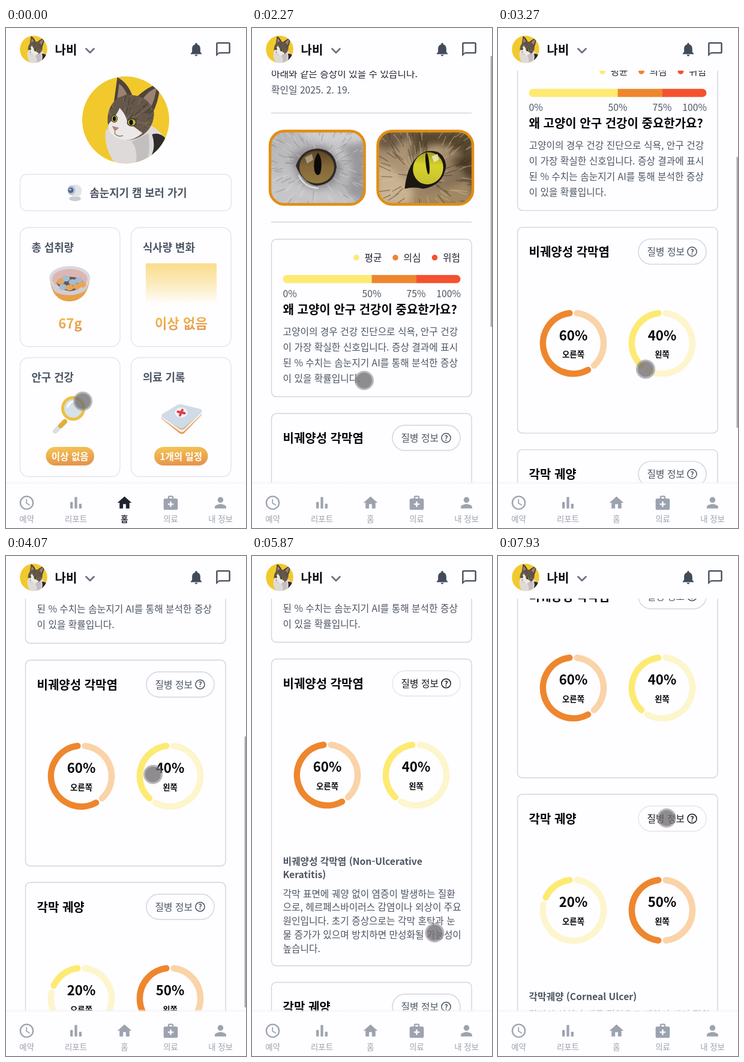
Recreate the animation shown at these times as an HTML page. Size 400 px wide and 832 px high, loop 8000 ms.

```html
<!DOCTYPE html>
<html lang="ko">
<head>
<meta charset="utf-8">
<title>고양이 건강</title>
<style>
html, body { margin: 0; width: 100%; height: 100%; overflow: hidden; background: #fefdff; }
svg { display: block; position: fixed; inset: 0; width: 100%; height: 100%; }
text { font-family: "Noto Sans CJK KR", "Noto Sans CJK", "Noto Sans KR", sans-serif; }
</style>
</head>
<body>
<svg id="stage" viewBox="0 0 400 832"></svg>
<script>
const LOOP = 8000;
const INK = '#050507', GRAY = '#4b5563', MUTED = '#9ca3af', LINE = '#d1d3de', PALE = '#e4e4ee';
const YELLOW = '#fdea72', ORANGE = '#ee862e', RED = '#f4512f';
const TINT = { [YELLOW]: '#fdf5cc', [ORANGE]: '#fad3a8' };
const BRAND = '솜눈지기';

// cy is the optical middle of the line
const text = (x, cy, size, str, fill = INK, bold = 0, anchor = 'start') =>
  `<text x="${x}" y="${cy + size * .36}" font-size="${size}" font-weight="${bold ? 700 : 400}" fill="${fill}" text-anchor="${anchor}">${str}</text>`;
const lines = (x, cy, step, rows, fill) => rows.map((row, i) => text(x, cy + i * step, 15.75, row, fill)).join('');
const box = (x, y, w, h, r, stroke, attrs = '') =>
  `<rect x="${x}" y="${y}" width="${w}" height="${h}" rx="${r}" fill="#fefdff" stroke="${stroke}" stroke-width="1.4" ${attrs}/>`;
const path = (d, fill, attrs = '') => `<path d="${d}" fill="${fill}" ${attrs}/>`;
const stroke = (d, color, w, attrs = '') =>
  path(d, 'none', `stroke="${color}" stroke-width="${w}" stroke-linecap="round" stroke-linejoin="round" ${attrs}`);
const oval = (x, y, rx, ry, fill, attrs = '') => `<ellipse cx="${x}" cy="${y}" rx="${rx}" ry="${ry}" fill="${fill}" ${attrs}/>`;
const dot = (x, y, r, fill, attrs) => oval(x, y, r, r, fill, attrs);
const rule = y => `<path d="M32 ${y}H366" stroke="${LINE}" stroke-width="1.5"/>`;
const icon = (x, y, s, d, fill) => path(d, fill, `transform="translate(${x - 12 * s} ${y - 12 * s}) scale(${s})"`);
const gradient = (id, x2, y2, stops) =>
  `<linearGradient id="${id}" x1="0" y1="0" x2="${x2}" y2="${y2}">${stops.map((c, i) =>
    `<stop offset="${i / (stops.length - 1)}" stop-color="${c}"/>`).join('')}</linearGradient>`;
const soft = art => `<g filter="url(#soft)">${art}</g>`;

// Seeded hairs in a w x h area; angle(x, y) gives their direction
function fur(seed, count, x0, y0, w, h, len, angle, colors) {
  const rand = () => (seed = seed * 16807 % 2147483647) / 2147483647;
  return colors.map(color => {
    let d = '';
    for (let i = 0; i < count; i++) {
      const x = x0 + rand() * w, y = y0 + rand() * h;
      const a = angle(x, y) + (rand() - .5) * .6, l = len * (.6 + rand() * .8);
      d += `M${x.toFixed(1)} ${y.toFixed(1)}l${(l * Math.cos(a)).toFixed(1)} ${(l * Math.sin(a)).toFixed(1)}`;
    }
    return stroke(d, color, 1.5, 'opacity=".42"');
  }).join('');
}
const away = (cx, cy) => (x, y) => Math.atan2(y - cy, x - cx);

const ICONS = {
  bell: 'M12 22c1.1 0 2-.9 2-2h-4c0 1.1.89 2 2 2zm6-6v-5c0-3.07-1.64-5.64-4.5-6.32V4c0-.83-.67-1.5-1.5-1.5s-1.5.67-1.5 1.5v.68C7.63 5.36 6 7.92 6 11v5l-2 2v1h16v-1l-2-2z',
  chat: 'M20 2H4c-1.1 0-2 .9-2 2v18l4-4h14c1.1 0 2-.9 2-2V4c0-1.1-.9-2-2-2zm0 14H6l-2 2V4h16v12z',
  clock: 'M12 2a10 10 0 1 0 0 20a10 10 0 1 0 0-20zm0 18a8 8 0 1 1 0-16a8 8 0 1 1 0 16zM12.5 7H11v6l5.2 3.1.8-1.2-4.5-2.7z',
  bars: 'M4 11h3.6v9H4zm6.2-7h3.6v16h-3.6zm6.2 9.5H20V20h-3.6z',
  home: 'M10 20v-6h4v6h5v-8h3L12 3 2 12h3v8z',
  medical: 'M20 6h-4V4c0-1.1-.9-2-2-2h-4c-1.1 0-2 .9-2 2v2H4c-1.1 0-2 .9-2 2v12c0 1.1.9 2 2 2h16c1.1 0 2-.9 2-2V8c0-1.1-.9-2-2-2zM10 4h4v2h-4V4zm6 11h-3v3h-2v-3H8v-2h3v-3h2v3h3v2z',
  person: 'M12 12c2.21 0 4-1.79 4-4s-1.79-4-4-4-4 1.79-4 4 1.79 4 4 4zm0 2c-2.67 0-8 1.34-8 4v2h16v-2c0-2.66-5.33-4-8-4z'
};

const HEAD = 'M-30-6Q-26-36 2-42Q38-42 47-14Q48 10 30 24Q4 42-18 26Q-32 14-30-6Z';
const cat = `<g id="cat" clip-path="url(#round)">
  <rect x="-73" y="-73" width="146" height="146" fill="#f2c92c"/>
  ${path('M-33 16Q-38 46-16 75L60 75 62 26Q40 0 20 8Z', '#dedad9')}
  ${path('M10 36Q22 52 16 75L34 75Q42 50 38 22Z', '#c3bfc0')}
  ${path('M44 24Q62 18 74 42L72 75 30 75Q54 55 44 24Z', '#2f2b2a')}
  ${path('M-21-20L-14-71Q4-62 12-38Z', '#4f443a')}${path('M-14-36L-11-60Q-2-54 3-40Z', '#9c8272')}
  ${path('M18-38Q40-58 57-60Q56-32 44-10Z', '#4f443a')}${path('M29-36Q40-50 51-53Q49-34 42-22Z', '#9c8272')}
  ${path(HEAD, '#65574a')}
  <g clip-path="url(#head)">${fur(11, 45, -34, -44, 82, 66, 9, away(-6, 12), ['#2f2822', '#96846e'])}</g>
  ${path('M-10-20Q0-10 3 4Q18 14 28 22Q4 42-18 28Q-33 17-28 6Q-16-6-10-20Z', '#ece8e7')}
  ${oval(-19, -2, 5.5, 6.5, '#2b251d')}${oval(-19, -2, 4.5, 5.5, '#bdb53d')}${oval(-19, -2, 2.6, 4, '#14110e')}
  ${oval(10, 4, 8, 6.8, '#2b251d')}${oval(10, 4, 6.6, 5.6, '#bdb53d')}${oval(9, 4, 3.2, 4.6, '#14110e')}
  ${path('M-23 10L-11 13-18 19Z', '#b8837a')}${stroke('M-18 19L-18 23M-18 23Q-12 29-5 26', '#8d7872', 1.4)}
</g>`;
const useCat = (x, y, r) => `<use href="#cat" transform="translate(${x} ${y}) scale(${r / 72.5})"/>`;

const webcam = oval(115, 284, 10, 4, '#c9c9d2') + dot(116, 271, 10.5, '#e3e3ea') +
  oval(109, 270, 6.5, 8, '#bcc0cd') + dot(108, 270, 4.5, '#4d648c') + dot(107, 269, 1.8, '#a9c6ee');
const bowl = path('M73 416Q76 455 107 455Q137 453 140 414Z', '#e8a04b') +
  path('M72.5 414Q74 432 83 440Q107 450 131 438Q139 430 140 412Z', '#cfcdd3') +
  oval(106.3, 416, 34, 20, '#d9d8de') + oval(106.3, 418, 29.5, 17, '#dcb6b1') +
  path('M84 424Q92 414 106 414Q124 414 130 424Q122 437 106 438Q90 436 84 424Z', '#5d5a60') +
  [[91, 422, 0], [100, 417, 1], [111, 423, 1], [121, 420, 1], [95, 431, 1], [106, 432, 0], [118, 430, 0], [127, 427, 0]]
    .map(([x, y, c]) => oval(x, y, 6.5, 5, c ? '#a6bbd2' : '#e7a557')).join('');
const magnifier = stroke('M97 656L82 671', '#d9dfe4', 8) + stroke('M98 655L91 662', '#e6ad38', 8) +
  `<ellipse cx="112" cy="633" rx="17.5" ry="18" fill="#d5e2ea" stroke="#eebf42" stroke-width="5"/>` +
  stroke('M103 630Q106 622 114 621', '#fff', 3);
const kit = path('M259 650L289 674Q293 677 297 674L326 644 326 640 260 645Z', '#e59a4c') +
  path('M259 645L289 667Q293 669 297 667L326 638 326 643 297 671Q293 674 289 671L260 650Z', '#eeeef2') +
  path('M261 642L286 627Q290 625 295 627L324 634Q328 636 325 640L297 665Q293 668 288 665L261 648Q258 645 261 642Z', '#cfdbe6') +
  oval(292, 640, 10.5, 8.5, '#f3f3f6') + stroke('M286.5 638.5L297.5 641M290 644.5L294 635.5', '#de3e48', 4);
const megaphone = path('M36 124L49 119 52 133 37 132Q32 128 36 124Z', '#d98a4a') +
  path('M34 125L40 123 41 133 36 132Z', '#4a4a55') + path('M40 132L46 133 47 139 43 138Z', '#5a5560') +
  oval(51.5, 126.5, 5.5, 9.5, '#f0b64f', 'transform="rotate(-14 51.5 126.5)"') +
  oval(52, 126.5, 3.4, 7, '#594a45', 'transform="rotate(-14 52 126.5)"') + stroke('M57 120L59 118M59 126L61 126', '#e8a94c', 1.5);

const badge = (x, w, str) => `<rect x="${x}" y="697" width="${w}" height="31" rx="15.5" fill="url(#warm)"/>` +
  text(x + w / 2, 713, 15.6, str, '#fff', 1, 'middle');

const home = `<g id="home">
  ${useCat(199.5, 153, 72.5)}
  ${box(23.5, 243.5, 352, 60.5, 11, PALE)}${webcam}${text(139.5, 275, 17.8, BRAND + ' 캠 보러 가기', GRAY, 1)}
  ${[[23.5, 332], [208.5, 332], [23.5, 548.5], [208.5, 548.5]].map(([x, y]) => box(x, y, 166.5, 198, 14, PALE)).join('')}
  ${text(42.5, 365.5, 17.8, '총 섭취량', GRAY, 1)}${text(228, 365.5, 17.8, '식사량 변화', GRAY, 1)}
  ${text(42.5, 582, 17.8, '안구 건강', GRAY, 1)}${text(228, 582, 17.8, '의료 기록', GRAY, 1)}
  ${bowl}${text(107, 492, 22.2, '67g', 'url(#warm)', 1, 'middle')}
  <rect x="233" y="391.5" width="118" height="66" fill="url(#area)"/>
  ${text(292, 492, 22.2, '이상 없음', 'url(#warm)', 1, 'middle')}
  ${magnifier}${badge(66.5, 80.5, '이상 없음')}
  ${kit}${badge(247, 89.5, '1개의 일정')}
</g>`;

// Photos are drawn in a 162 x 126 space
const grayEye = `<rect width="162" height="126" fill="url(#grayFur)"/>
  ${soft(path('M40 0Q88 30 150 20L162 0Z', '#cfced1') + path('M0 66Q30 100 80 100T162 126H0Z', '#c6c5c8') +
    path('M122 26Q150 60 130 104L162 126V20Z', '#98979b') + path('M36 46Q60 22 96 28L122 60 112 88 80 100 52 88Z', '#8b898c'))}
  ${fur(5, 70, 0, 0, 162, 126, 12, away(80, 60), ['#7d7c80', '#dddcdf'])}
  ${path('M45 60Q54 32 82 31Q111 34 113 62Q110 90 80 93Q58 90 45 60Z', '#2f2926')}${oval(80, 62, 29, 27, 'url(#amber)')}
  ${path('M82 38Q91 50 86 72Q80 80 76 68Q73 50 82 38Z', '#0b0a09')}${path('M60 46L72 40 74 50 64 56Z', '#ddd8cf', 'opacity=".5"')}
  ${stroke('M50 76Q60 96 82 97', '#dedcdf', 2.5)}`;
const brownEye = `<rect width="163" height="126" fill="url(#brownFur)"/>
  ${soft(path('M0 0H70Q40 26 16 34L0 26Z', '#6a5844') + path('M60 0H163V66Q140 26 96 24Q76 28 58 50Z', '#57462f') +
    path('M0 52Q36 66 62 104L56 126H0Z', '#c9b291') + path('M66 106Q112 102 163 76V126H60Z', '#a08864') +
    path('M120 50Q150 60 163 110V40Z', '#4b3b28'))}
  ${fur(9, 80, 0, 0, 163, 126, 16, away(70, 84), ['#36291b', '#d6c19d'])}
  ${path('M47 98Q52 48 82 36Q112 30 116 60Q112 92 78 98Q62 94 47 98Z', '#1d1712')}
  ${oval(86, 64, 25, 27, 'url(#lime)', 'transform="rotate(22 86 64)"')}
  ${oval(85, 56, 3, 18, '#14110c', 'transform="rotate(-6 85 56)"')}${path('M92 44L102 40 104 50 96 54Z', '#f8f6d8', 'opacity=".7"')}`;
const photo = (id, art) => `<g id="${id}"><rect width="162" height="126" rx="25" fill="#fefdff"/>
  <g class="art" clip-path="url(#photo)">${art}</g>
  <rect class="frame" x="2" y="2" width="158" height="122" rx="24" fill="none" stroke="#e18d12" stroke-width="4.4"/></g>`;

// Arc on the donut; turns run counter-clockwise from the top
const RING = 50.6, INSET = 7 / 360;
function arc(cx, cy, from, to, color) {
  const at = turn => {
    const a = turn * 2 * Math.PI;
    return `${(cx - RING * Math.sin(a)).toFixed(2)} ${(cy - RING * Math.cos(a)).toFixed(2)}`;
  };
  const a = from + INSET, b = to - INSET;
  return stroke(`M${at(a)}A${RING} ${RING} 0 ${b - a > .5 ? 1 : 0} 0 ${at(b)}`, color, 10.5);
}
const donut = (cx, pct, side, color) =>
  arc(cx, 193, pct / 100, 1, TINT[color]) + arc(cx, 193, 0, pct / 100, color) +
  text(cx, 180, 22.2, pct + '%', INK, 1, 'middle') + text(cx, 211.5, 13.4, side, INK, 1, 'middle');

const disease = (id, y, name, right, left, info) => `<g id="${id}" transform="translate(0 ${y})">
  ${box(32.5, 0, 333.5, 342.5, 8, LINE, 'class="card"')}
  ${text(51.5, 41.5, 20, name, INK, 1)}
  ${box(234, 19.5, 113, 42, 21, LINE, 'class="pill"')}
  <g class="ask" fill="${GRAY}" stroke="${GRAY}">
    <g stroke="none">${text(248.5, 41, 15.75, '질병 정보', 'inherit')}${text(323.5, 40.8, 12, '?', 'inherit', 1, 'middle')}</g>
    <circle cx="323.5" cy="40.5" r="7.6" fill="none" stroke-width="1.5"/></g>
  ${donut(125.5, right[0], '오른쪽', right[1])}${donut(273.5, left[0], '왼쪽', left[1])}
  <g class="info">${info}</g></g>`;

const detail = `<g id="detail">
  ${megaphone}
  ${text(68, 129, 22.2, 'AI 분석 결과 <tspan fill="#dc3545">의심 증상 발견</tspan>', INK, 1)}
  ${text(32, 165, 15.75, '아래와 같은 증상이 있을 수 있습니다.', '#1f2430')}
  ${text(32, 192, 15.75, '확인일 2025. 2. 19.', GRAY)}
  ${rule(230.5)}${photo('eyeA', grayEye)}${photo('eyeB', brownEye)}${rule(412)}
  ${box(32.5, 440.5, 333.5, 262, 8, LINE)}
  ${[[174, YELLOW, '평균'], [239, ORANGE, '의심'], [304.5, RED, '위험']].map(([x, c, s]) =>
    dot(x, 471, 4.8, c) + text(x + 13.5, 471, 15.75, s, '#1f2430')).join('')}
  <g clip-path="url(#bar)"><rect x="51" y="499" width="148.5" height="16" fill="${YELLOW}"/>
    <rect x="199.5" y="499" width="74.5" height="16" fill="${ORANGE}"/><rect x="274" y="499" width="75" height="16" fill="${RED}"/></g>
  ${text(51.5, 531, 15.75, '0%', GRAY)}${text(199.5, 531, 15.75, '50%', GRAY, 0, 'middle')}
  ${text(273.5, 531, 15.75, '75%', GRAY, 0, 'middle')}${text(348, 531, 15.75, '100%', GRAY, 0, 'end')}
  ${text(51.5, 558, 20, '왜 고양이 안구 건강이 중요한가요?', INK, 1)}
  ${lines(51.5, 594, 26, ['고양이의 경우 건강 진단으로 식욕, 안구 건강', '이 가장 확실한 신호입니다. 증상 결과에 표시',
    `된 % 수치는 ${BRAND} AI를 통해 분석한 증상`, '이 있을 확률입니다.'], GRAY)}
  ${disease('first', 730.5, '비궤양성 각막염', [60, ORANGE], [40, YELLOW],
    text(51.5, 336.5, 15.75, '비궤양성 각막염 (Non-Ulcerative', GRAY, 1) + text(51.5, 359, 15.75, 'Keratitis)', GRAY, 1) +
    lines(51.5, 390.5, 22.75, ['각막 표면에 궤양 없이 염증이 발생하는 질환', '으로, 헤르페스바이러스 감염이나 외상이 주요',
      '원인입니다. 초기 증상으로는 각막 혼탁과 눈', '물 증가가 있으며 방치하면 만성화될 가능성이', '높습니다.'], GRAY))}
  ${disease('second', 1100.5, '각막 궤양', [20, YELLOW], [50, ORANGE],
    text(51.5, 336.5, 15.75, '각막궤양 (Corneal Ulcer)', GRAY, 1) +
    text(51.5, 367, 15.75, '각막의 상처나 세균 감염으로 궤양이 생긴 질환', GRAY))}
</g>`;

const tab = (x, name, label) => icon(x, 790, 1.18, ICONS[name], MUTED) + text(x, 817.5, 13.4, label, MUTED, 0, 'middle');
const chrome = `<rect width="400" height="71" fill="#fefdff"/>${useCat(46, 35.5, 22.8)}
  ${text(81.5, 37, 20, '나비', INK, 1)}${stroke('M133.5 34.5L140 41 146.5 34.5', '#6b7280', 2.8)}
  ${icon(317, 35.5, 1.14, ICONS.bell, '#414b59')}${icon(362, 35.5, 1.18, ICONS.chat, '#414b59')}
  <rect y="754" width="400" height="4" fill="url(#shade)"/><rect y="758" width="400" height="74" fill="#fefdff"/>
  ${tab(34.5, 'clock', '예약')}${tab(116.5, 'bars', '리포트')}${tab(274.5, 'medical', '의료')}${tab(357.5, 'person', '내 정보')}
  <g id="idle">${tab(197.5, 'home', '홈')}</g>
  <g id="active">${icon(197.5, 790, 1.18, ICONS.home, '#1f2430')}${text(197.5, 817.5, 13.4, '홈', '#1f2430', 1, 'middle')}</g>`;

document.getElementById('stage').innerHTML = `<defs>
  <clipPath id="round"><circle r="72.5"/></clipPath>
  <clipPath id="head"><path d="${HEAD}"/></clipPath>
  <clipPath id="view"><rect y="71" width="400" height="687"/></clipPath>
  <clipPath id="bar"><rect x="51.5" y="500" width="296" height="13.5" rx="6.75"/></clipPath>
  <clipPath id="photo"><rect x="2" y="2" width="158" height="122" rx="24"/></clipPath>
  <filter id="soft"><feGaussianBlur stdDeviation="6"/></filter>
  ${gradient('warm', .25, 1, ['#f4c854', '#e6964b'])}
  ${gradient('area', 0, 1, ['#fadd8b', '#fceabb', '#fefcf8'])}
  ${gradient('shade', 0, 1, ['#f5f5f800', '#f3f3f7'])}
  ${gradient('grayFur', 1, 1, ['#b2b1b4', '#c4c3c6', '#a5a4a7'])}
  ${gradient('brownFur', 1, .8, ['#9c8569', '#b39a7a', '#665440'])}
  ${gradient('amber', 0, 1, ['#5c4524', '#85693a', '#93783f'])}
  ${gradient('lime', .3, 1, ['#938c1e', '#d8d22c', '#c7c230'])}
  ${cat}</defs>
  <rect width="400" height="832" fill="#fefdff"/>
  <g clip-path="url(#view)">${home}${detail}</g>${chrome}
  <rect id="thumb" x="397.6" width="2.4" fill="#a9a8ad"/>
  <g id="touch">${dot(0, 0, 16, '#8e8b91', 'fill-opacity=".62"')}${dot(0, 0, 13, '#5c585c', 'fill-opacity=".45"')}</g>`;

// Smooth monotone interpolation through [time, value] points
function track(points) {
  const slope = i => points[i + 1] ? (points[i + 1][1] - points[i][1]) / (points[i + 1][0] - points[i][0]) : 0;
  const tangent = i => {
    const a = i ? slope(i - 1) : 0, b = slope(i);
    return a * b > 0 ? 2 * a * b / (a + b) : 0;
  };
  return t => {
    if (t <= points[0][0]) return points[0][1];
    const i = points.findIndex(p => p[0] > t) - 1;
    if (i < 0) return points[points.length - 1][1];
    const [t0, v0] = points[i], [t1, v1] = points[i + 1], d = t1 - t0, u = (t - t0) / d, w = 1 - u;
    return v0 * w * w * (1 + 2 * u) + v1 * u * u * (3 - 2 * u) + d * u * w * (tangent(i) * w - tangent(i + 1) * u);
  };
}

const moves = [[0, 128, 621], [450, 128, 621], [670, 134, 611], [1650, 197, 697], [2000, 197, 697], [2270, 187, 587],
  [2560, 181, 425], [2950, 252, 690], [3060, 252, 690], [3270, 246, 568], [3950, 242, 400], [4700, 285, 193],
  [5250, 285, 193], [6000, 306, 664], [6230, 306, 664], [6530, 303, 502], [6860, 300, 330], [7450, 281, 436], [8000, 281, 436]];
const touchX = track(moves.map(([t, x]) => [t, x]));
const touchY = track(moves.map(([t, , y]) => [t, y]));
const scrollAt = track([[2040, 0], [2270, 88.5], [2560, 250], [2800, 285], [3090, 285], [3270, 398.5], [3900, 545], [4150, 559],
  [6260, 559], [6530, 704], [6860, 850], [7000, 871]]);
const thumbAlpha = track([[2020, 0], [2060, 1], [4600, 1], [4960, 0], [6230, 0], [6270, 1], [7400, 1], [7700, 0]]);

const OPENED = 300, PHOTO_A = 520, PHOTO_B = 740;
const TAP_A = 4960, EXPAND_A = 5130, TAP_B = 7600, COLLAPSE_A = 7730, EXPAND_B = 7900;
const EXTRA = 168, CONTENT = 1536, STAGE = 832;

const $ = id => document.getElementById(id);
const show = (el, on) => el.setAttribute('display', on ? 'inline' : 'none');
const set = (el, attrs) => Object.entries(attrs).forEach(([k, v]) => el.setAttribute(k, v));

function setPhoto(id, x, w, loaded) {
  const el = $(id);
  el.setAttribute('transform', `translate(${x} 258.5)`);
  el.querySelector('.frame').setAttribute('width', w - 4.4);
  show(el.querySelector('.art'), loaded);
}
function setDisease(id, open, hot) {
  const el = $(id), color = hot ? '#16181d' : GRAY;
  el.querySelector('.card').setAttribute('height', 342.5 + (open ? EXTRA : 0));
  el.querySelector('.pill').setAttribute('stroke', hot ? PALE : LINE);
  set(el.querySelector('.ask'), { fill: color, stroke: color });
  show(el.querySelector('.info'), open);
}

function draw(t) {
  const inDetail = t >= OPENED, wide = t >= PHOTO_B;
  const openA = t >= EXPAND_A && t < COLLAPSE_A, openB = t >= EXPAND_B;
  const shift = openA ? EXTRA : 0;
  // Collapsing the first card keeps the second one in place
  const scroll = scrollAt(t) - (t >= COLLAPSE_A ? EXTRA - 1 : 0);
  show($('home'), !inDetail);
  show($('active'), !inDetail);
  show($('detail'), inDetail);
  show($('idle'), inDetail);
  setPhoto('eyeA', wide ? 28 : 32, 162, t >= PHOTO_A);
  setPhoto('eyeB', wide ? 207.5 : 211.5, wide ? 163 : 155, wide);
  setDisease('first', openA, t >= TAP_A && t < TAP_B);
  setDisease('second', openB, t >= TAP_B);
  $('detail').setAttribute('transform', `translate(0 ${-scroll.toFixed(2)})`);
  $('second').setAttribute('transform', `translate(0 ${1100.5 + shift})`);
  const ratio = STAGE / (CONTENT + shift);
  set($('thumb'), { y: scroll * ratio - 1.5, height: STAGE * ratio, opacity: thumbAlpha(t) });
  $('touch').setAttribute('transform', `translate(${touchX(t)} ${touchY(t)})`);
}

function tick() {
  draw(performance.now() % LOOP);
  requestAnimationFrame(tick);
}
tick();
</script>
</body>
</html>
```
